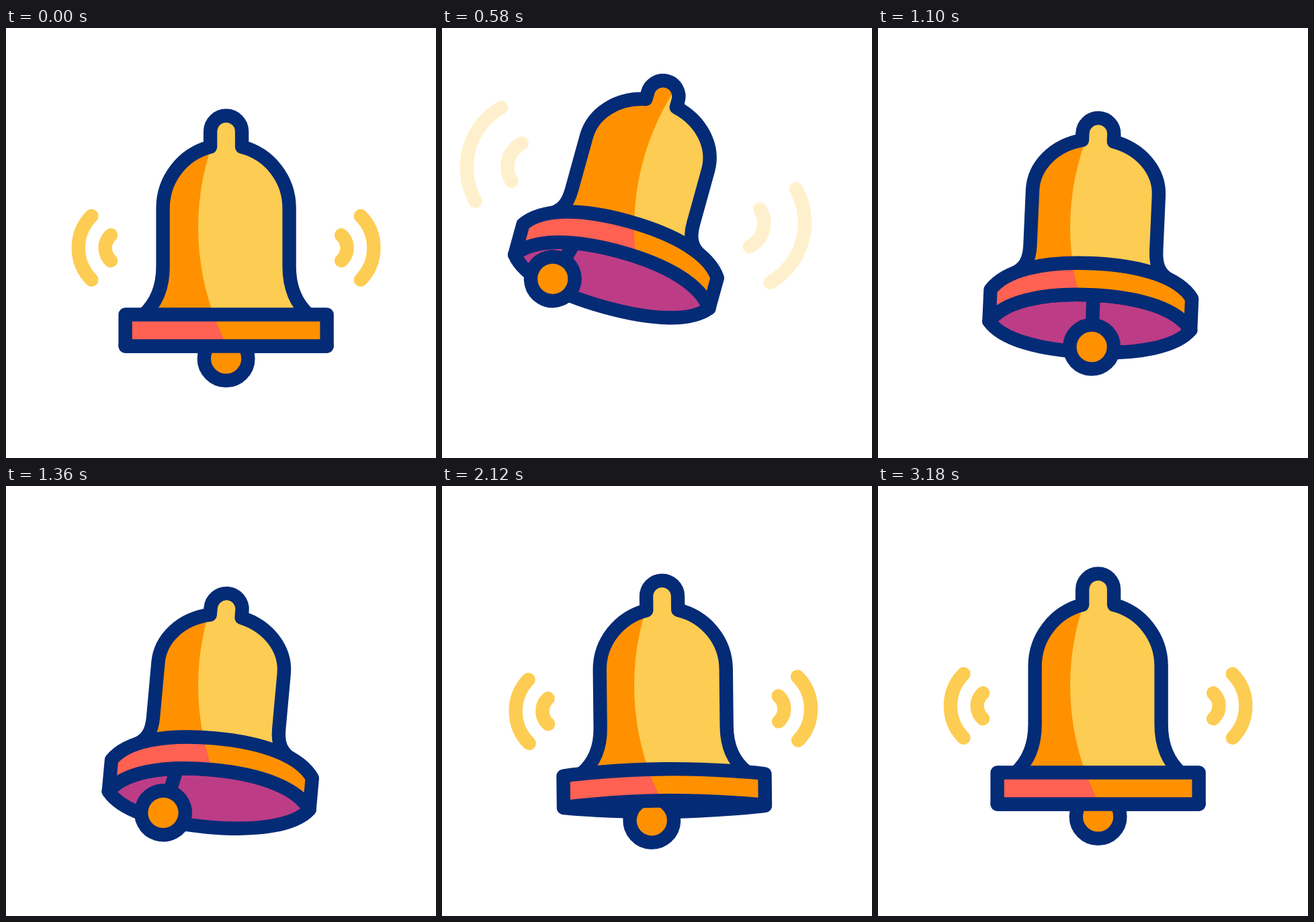
Recreate the animation shown at these times as an HTML page with a canvas. Size 640x640 px, loop 3.3 s.

```html
<!DOCTYPE html>
<html lang="en">
<head>
<meta charset="utf-8">
<title>Ringing bell</title>
<style>
  html, body { margin: 0; width: 100%; height: 100%; overflow: hidden; background: #fff; }
  canvas { display: block; width: 640px; height: 640px; }
</style>
</head>
<body>
<canvas id="stage" width="640" height="640"></canvas>
<script>
const ctx = document.getElementById('stage').getContext('2d');
const LOOP = 3300;
const NAVY = '#042b76', YELLOW = '#fdcc52', ORANGE = '#ff9100', RED = '#ff6152', PURPLE = '#bd3c86';
const MID_X = 327.6, HALF = 150, BAND = 47, TILT = 46;

// Smooth step from 0 to 1 between two times.
function ease(t, from, to) {
  const p = Math.min(1, Math.max(0, (t - from) / (to - from)));
  return p * p * (3 - 2 * p);
}

// Swing angle in radians; positive leans the bell's mouth to the right.
function swing(t, period, degrees) {
  return degrees * Math.PI / 180 * Math.cos(2 * Math.PI * t / period);
}

function poseAt(t) {
  const start = ease(t, 0, 360);
  const lean = start - ease(t, 1640, 2310);
  // The whole bell jumps up, then sinks steadily and slows near the lowest point.
  const sec = Math.min(t, 1640) / 1000;
  const drift = 109 * sec - 115.5 - 0.55 * sec ** 6;
  const bellSize = 34.6 / (1 + t / 1366) ** 2 * (1 - ease(t, 1850, 2650));
  const clapperSize = (20 + 40 * Math.exp(-t / 520)) * (1 - ease(t, 1650, 3180));
  return {
    lean,
    y: 154 + lean * drift,
    bell: swing(t, 406, start * bellSize),
    clapper: swing(t, 402, start * clapperSize),
    spread: t < 1000 ? 1 + 0.0009 * t : 0.53 + 0.47 * ease(t, 1600, 1900),
    glow: 1 - ease(t, 400, 680) + ease(t, 1590, 1780)
  };
}

// Curve across the rim from side -dir to side dir; bulge 1 arches up, negative sags.
function rimCurve(path, y, lean, dir, bulge = 1) {
  const top = y - TILT * lean * bulge;
  const nearX = (HALF - 20 * lean) * dir, nearY = y + 0.65 * lean * (top - y);
  path.bezierCurveTo(-nearX, nearY, -75 * dir, top, 0, top);
  path.bezierCurveTo(75 * dir, top, nearX, nearY, HALF * dir, y);
}

function bodyPath(q) {
  const cy = 114 - 26 * q, ry = 94 - 14 * q;
  const neck = Math.acos(23.5 / 94);
  const sideY = 201 - 31 * q, y1 = 235 - 43 * q;
  const x2 = 106 - 6 * q, y2 = 258 - 53 * q;
  const endX = 124 - 6 * q, endY = 274 - 60 * q;
  const path = new Path2D();
  path.moveTo(-endX, endY);
  path.bezierCurveTo(-x2, y2, -94, y1, -94, sideY);
  path.ellipse(0, cy, 94, ry, 0, Math.PI, Math.PI + neck);
  path.arc(0, 0, 23.5, Math.PI, 2 * Math.PI);
  path.ellipse(0, cy, 94, ry, 0, -neck, 0);
  path.lineTo(94, sideY);
  path.bezierCurveTo(94, y1, x2, y2, endX, endY);
  path.closePath();
  return path;
}

function rimPath(y, lean) {
  const path = new Path2D();
  path.moveTo(-HALF, y);
  rimCurve(path, y, lean, 1);
  path.lineTo(HALF, y + BAND);
  rimCurve(path, y + BAND, lean, -1);
  path.closePath();
  return path;
}

function mouthPath(y, lean) {
  const path = new Path2D();
  path.moveTo(-HALF, y);
  rimCurve(path, y, lean, 1);
  rimCurve(path, y, lean, -1, -0.86);
  path.closePath();
  return path;
}

function outlined(path, fill) {
  ctx.fillStyle = fill;
  ctx.fill(path);
  ctx.stroke(path);
}

// The lit area is one large circle that stays still while the bell moves.
function shaded(path, dark, light) {
  ctx.fillStyle = dark;
  ctx.fill(path);
  ctx.save();
  ctx.clip(path);
  ctx.setTransform(1, 0, 0, 1, 0, 0);
  ctx.beginPath();
  ctx.arc(664, 297, 378, 0, 2 * Math.PI);
  ctx.fillStyle = light;
  ctx.fill();
  ctx.restore();
  ctx.stroke(path);
}

// Two arcs per side, given by chord distance, half chord and depth.
function waves(y, s, alpha) {
  if (alpha <= 0) return;
  ctx.save();
  ctx.globalAlpha = alpha;
  ctx.strokeStyle = YELLOW;
  ctx.beginPath();
  for (const [x, h, depth] of [[200.2, 47.5, 19.5], [171.5, 19, 8.5]]) {
    const r = (h * h + depth * depth) / (2 * depth), a = Math.asin(h / r);
    const cx = 148 + s * (x - 148 - r * Math.cos(a));
    for (const [side, mid] of [[1, 0], [-1, Math.PI]]) {
      ctx.moveTo(side * cx + s * r * Math.cos(mid - a), y + s * r * Math.sin(mid - a));
      ctx.arc(side * cx, y, s * r, mid - a, mid + a);
    }
  }
  ctx.stroke();
  ctx.restore();
}

function clapper(angle, length) {
  ctx.save();
  ctx.rotate(angle);
  ctx.beginPath();
  ctx.moveTo(0, 120);
  ctx.lineTo(0, length);
  ctx.stroke();
  const ball = new Path2D();
  ball.arc(0, length, 32.8, 0, 2 * Math.PI);
  outlined(ball, ORANGE);
  ctx.restore();
}

function draw(t) {
  const pose = poseAt(t), { lean } = pose;
  const rimY = 272.5 - 33.6 * lean;

  ctx.setTransform(1, 0, 0, 1, 0, 0);
  ctx.fillStyle = '#fff';
  ctx.fillRect(0, 0, 640, 640);
  ctx.lineWidth = 20.4;
  ctx.lineCap = ctx.lineJoin = 'round';
  ctx.strokeStyle = NAVY;

  ctx.translate(MID_X - 5 * Math.sin(pose.bell), pose.y);
  ctx.rotate(-pose.bell);
  waves(173.3 - 21 * lean, pose.spread, pose.glow);
  outlined(mouthPath(rimY + BAND, lean), PURPLE);
  clapper(pose.bell - pose.clapper, 338 - 20.7 * lean);
  shaded(bodyPath(lean), ORANGE, YELLOW);
  shaded(rimPath(rimY, lean), RED, ORANGE);
}

const begin = performance.now();
function tick() {
  draw((performance.now() - begin) % LOOP);
  requestAnimationFrame(tick);
}
tick();
</script>
</body>
</html>
```
